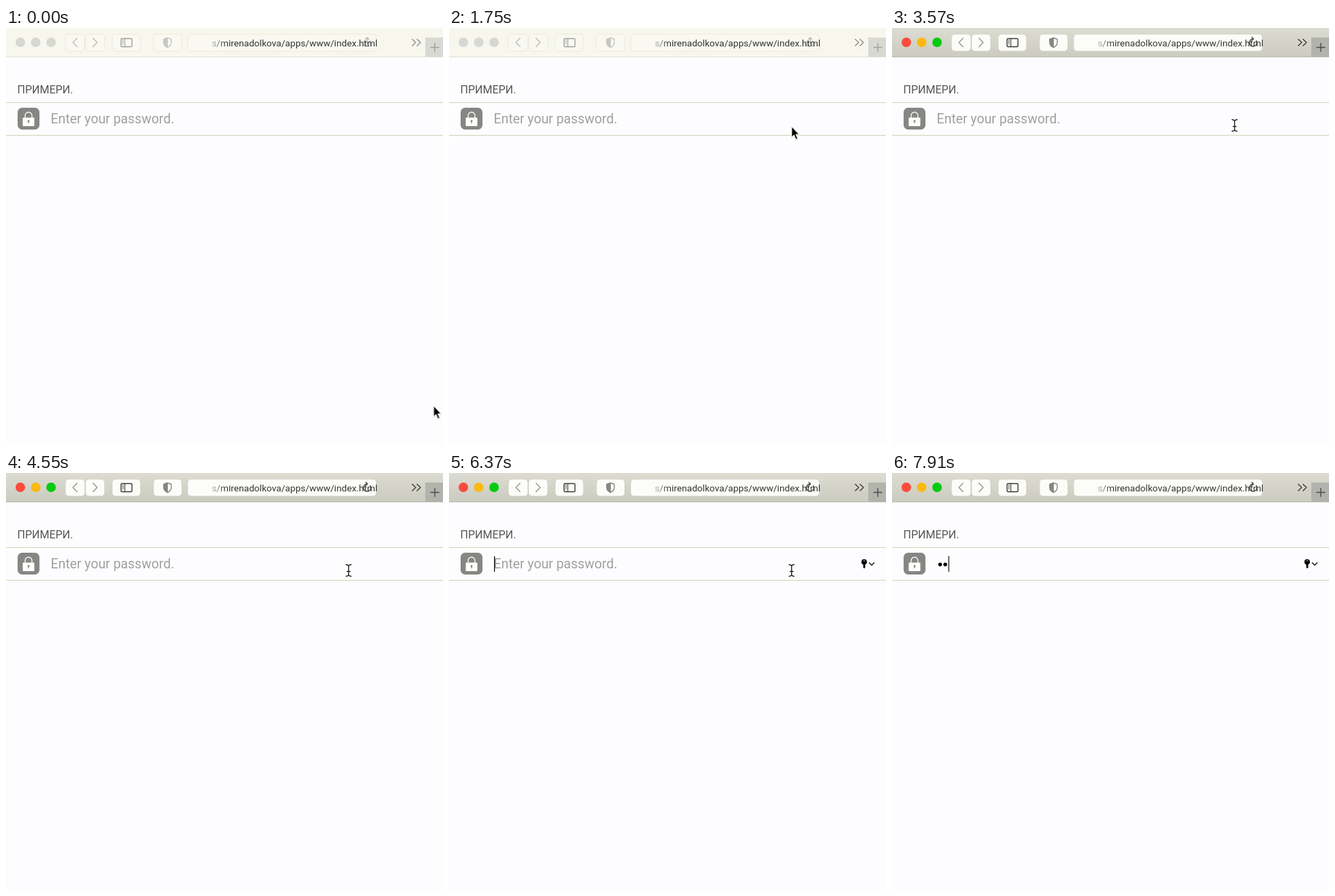
An HTML page for the animation above (8 s loop, 640 by 612 pixels).

```html
<!DOCTYPE html>
<html lang="bg">
<head>
<meta charset="utf-8">
<title>Примери</title>
<style>
  html, body { margin: 0; width: 100%; height: 100%; overflow: hidden; background: #fdfdff; }
  svg { display: block; width: 640px; height: 612px; font-family: Roboto, "Open Sans", sans-serif; }

  .idle {
    --button: #f9f9f2; --edge: #eaeada; --red: #d8d8d3; --amber: #d8d8d3; --green: #d8d8d3;
    --arrow: #bdbdb8; --panel: #a0a09c; --shield: #c8c8c3; --more: #8e8e8a;
    --reload: #b6b6b0; --tab: #d9d9d4; --plus: #a0a09c;
  }
  .live {
    --button: #fcfcf8; --edge: #d3d3c8; --red: #fb4b3d; --amber: #fcb911; --green: #06cb10;
    --arrow: #959590; --panel: #383834; --shield: #868682; --more: #3c3c38;
    --reload: #4c4c48; --tab: #b3b3ad; --plus: #4b4b48;
  }
  .button { fill: var(--button); stroke: var(--edge); }
  .line { fill: none; stroke-width: 1.4; stroke-linecap: round; stroke-linejoin: round; }

  .step { animation: 8s step-end infinite; }
  .live { animation-name: wake; }
  .beam { animation-name: beam; }
  .key { animation-name: focus; }
  .caret { animation-name: caret; }
  .hint { animation-name: hint; }
  .dot1 { animation-name: dot1; }
  .dot2 { animation-name: dot2; }
  .pointer { animation-name: pointer; }
  .path { animation: path 8s infinite; }

  @keyframes wake { 0% { opacity: 0 } 36.5%, 100% { opacity: 1 } }
  @keyframes pointer { 0% { opacity: 1 } 36.5%, 100% { opacity: 0 } }
  @keyframes beam { 0% { opacity: 0 } 36.5% { opacity: 1 } 89.5%, 100% { opacity: 0 } }
  @keyframes focus { 0% { opacity: 0 } 61.5%, 100% { opacity: 1 } }
  @keyframes hint { 0% { opacity: 1 } 89.5%, 100% { opacity: 0 } }
  @keyframes dot1 { 0% { opacity: 0 } 89.5%, 100% { opacity: 1 } }
  @keyframes dot2 { 0% { opacity: 0 } 97%, 100% { opacity: 1 } }
  @keyframes caret {
    0% { opacity: 0; transform: none }
    63.4% { opacity: 1; transform: none }
    89.5% { opacity: 1; transform: translateX(9px) }
    97%, 100% { opacity: 1; transform: translateX(16.5px) }
  }
  @keyframes path {
    0%, .25% { transform: translate(626.5px, 555px); animation-timing-function: cubic-bezier(.4, 0, .6, 1) }
    9.125% { transform: translate(479px, 190.5px); animation-timing-function: linear }
    9.625% { transform: translate(483px, 175px); animation-timing-function: ease-out }
    14% { transform: translate(501px, 151px); animation-timing-function: linear }
    21.2% { transform: translate(502px, 149px); animation-timing-function: ease-out }
    21.8%, 100% { transform: translate(502px, 145px) }
  }
</style>
</head>
<body>
<svg viewBox="0 0 640 612">
  <defs>
    <linearGradient id="metal" x2="0" y2="1">
      <stop stop-color="#dcdcd2"/><stop offset="1" stop-color="#cbcbc0"/>
    </linearGradient>
    <linearGradient id="fade" gradientUnits="userSpaceOnUse" x1="296" x2="322">
      <stop stop-color="#333330" stop-opacity=".1"/><stop offset="1" stop-color="#333330"/>
    </linearGradient>
    <clipPath id="address"><rect x="266" y="8" width="277" height="28"/></clipPath>
    <path id="arrow" d="M0 0v15l3.4-3.2 2.7 6.4 2.4-1-2.7-6.2h4.5z"/>

    <g id="tools">
      <circle cx="21" cy="21" r="7" style="fill:var(--red)"/>
      <circle cx="43.5" cy="21" r="7" style="fill:var(--amber)"/>
      <circle cx="66" cy="21" r="7" style="fill:var(--green)"/>
      <g class="button">
        <rect x="87" y="9" width="28.5" height="25" rx="5"/>
        <rect x="116.5" y="9" width="28" height="25" rx="5"/>
        <rect x="155.5" y="9" width="41.5" height="25" rx="5"/>
        <rect x="216" y="9" width="41.5" height="25" rx="5"/>
        <rect x="266" y="9" width="276.5" height="25" rx="5"/>
      </g>
      <path class="line" d="M104 15l-6 6.3 6 6.3M127.5 15l6 6.3-6 6.3" style="stroke:var(--arrow)"/>
      <g class="line" style="stroke:var(--panel)">
        <rect x="168.5" y="15.5" width="16" height="12" rx="1.5"/>
        <path d="M174 15.5v12M170.5 18h1.5M170.5 20.5h1.5M170.5 23h1.5" stroke-width="1.1"/>
      </g>
      <g style="stroke:var(--shield)">
        <path class="line" d="M236.5 14.5l5.5 2v5q0 4.5-5.5 7-5.5-2.5-5.5-7v-5z"/>
        <path d="M236.5 14.5v14q-5.5-2.5-5.5-7v-5z" style="fill:var(--shield)"/>
      </g>
      <path class="line" d="M595 16.5l5 4.8-5 4.8M602 16.5l5 4.8-5 4.8" style="stroke:var(--more)"/>
      <rect x="614" y="14" width="26" height="28" style="fill:var(--tab)"/>
      <path class="line" d="M622 28.5h12M628 22.5v12" style="stroke:var(--plus)" stroke-width="1.2"/>
    </g>
  </defs>

  <rect width="640" height="612" fill="#fdfdff"/>

  <g class="idle">
    <rect width="640" height="42" fill="#f7f7ee"/>
    <use href="#tools"/>
    <path class="line" d="M525 18.5v8h8v-8M529 23v-9M526.5 16.5l2.5-2.5 2.5 2.5" style="stroke:var(--reload)"/>
    <path d="M0 42.5h640" stroke="#dedecf"/>
  </g>
  <g class="live step">
    <rect width="640" height="42" fill="url(#metal)"/>
    <use href="#tools"/>
    <path class="line" d="M533.5 18.5a5.5 5.5 0 1 1-4.5-2.5M527 13.5l2.5 2.5-2.5 2.5" style="stroke:var(--reload)"/>
    <path d="M0 42.5h640" stroke="#b9b9ae"/>
  </g>
  <text x="544" y="27" font-size="13.65" text-anchor="end" fill="url(#fade)" clip-path="url(#address)">s/mirenadolkova/apps/www/index.html</text>

  <text x="16.5" y="95.5" font-size="16" fill="#555552">ПРИМЕРИ.</text>
  <path d="M0 109.5h640M0 157.5h640" stroke="#d2d2b4"/>

  <rect x="17" y="117" width="32" height="32" rx="6.5" fill="#868685"/>
  <path d="M28 132v-3.5a5 5 0 0 1 10 0v3.5" fill="none" stroke="#fdfdfa" stroke-width="1.3"/>
  <rect x="24.5" y="131.5" width="17" height="12.5" rx="1" fill="#fdfdfa"/>
  <path d="M33 137v3" stroke="#868685" stroke-width="1.2"/>
  <circle cx="33" cy="136.5" r="1.5" fill="#868685"/>

  <text class="hint step" x="65.5" y="140" font-size="19.35" fill="#a0a09d">Enter your password.</text>
  <circle class="dot1 step" cx="70.5" cy="134.3" r="2.7"/>
  <circle class="dot2 step" cx="78" cy="134.3" r="2.7"/>
  <rect class="caret step" x="66" y="122" width="1.2" height="23"/>

  <g class="key step">
    <circle cx="608" cy="130.5" r="4"/>
    <path d="M606.7 133h2.8v5.5l-1.4 1.7-1.4-1.7z"/>
    <circle cx="608" cy="128.7" r=".8" fill="#fdfdff"/>
    <path class="line" d="M615.5 131.8l3.5 3.5 3.5-3.5" stroke="#111"/>
  </g>

  <path class="beam step line" d="M498 134.5q3.7 0 3.7 3 0-3 3.8-3M501.7 137v12M498 151.5q3.7 0 3.7-3 0 3 3.8 3M499.5 144.5h4.5" stroke="#222220"/>

  <g class="pointer step">
    <g class="path">
      <use href="#arrow" y="1" fill="#e8e8d8" stroke="#ececdc" stroke-width="3" stroke-linejoin="round" opacity=".7"/>
      <use href="#arrow" stroke="#fff" stroke-width=".7"/>
    </g>
  </g>
</svg>
</body>
</html>
```
